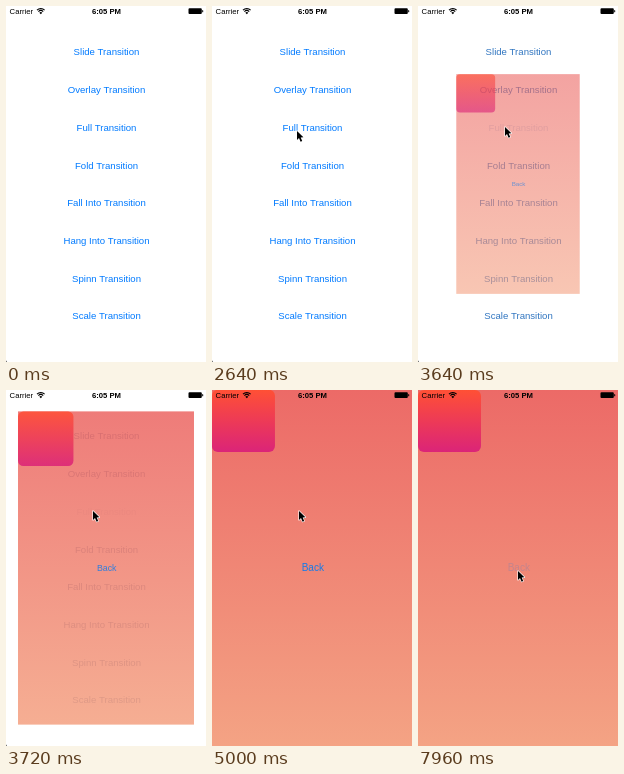
An HTML page with a canvas for the animation above (8 s loop, 200 by 356 pixels).

```html
<!DOCTYPE html>
<html lang="en">
<head>
<meta charset="utf-8">
<title>Full transition</title>
<style>
html, body { margin: 0; width: 100%; height: 100%; overflow: hidden; background: #fff; }
canvas { display: block; width: 100vw; height: 100vh; }
</style>
</head>
<body>
<canvas id="stage"></canvas>
<script>
const W = 200, H = 356, LOOP = 8000;
const FONT = '"Liberation Sans", Arial, sans-serif';
const BLUE = [0, 122, 255], DIMMED = [110, 110, 110];
const ITEMS = ['Slide', 'Overlay', 'Full', 'Fold', 'Fall Into', 'Hang Into', 'Spinn', 'Scale'];
const PRESS = 3240, OPEN = 3444, PRESS_BACK = 7680;

// Pointer tip: time, x, y
const PATH = [
  [1160, -8, 265], [1680, 97, 192], [2040, 112, 152], [2480, 85, 125],
  [2800, 85, 125], [3200, 87, 121], [5760, 87, 121], [5880, 90, 136],
  [6080, 98.5, 169], [6480, 100, 181], [8000, 100, 181]
];

const canvas = document.getElementById('stage');
const ctx = canvas.getContext('2d');

const clamp = v => Math.max(0, Math.min(1, v));
const lerp = (a, b, p) => a + (b - a) * p;
const smooth = p => p * p * (3 - 2 * p);
const ramp = (t, start, length) => clamp((t - start) / length);

function spring(ms) {
  if (ms <= 0) return 0;
  const damping = 0.57, x = 8 * ms / 1000;
  const root = Math.sqrt(1 - damping * damping);
  return 1 - Math.exp(-damping * x) *
    (Math.cos(root * x) + damping / root * Math.sin(root * x));
}

function mix(a, b, p) {
  return `rgb(${a.map((v, i) => Math.round(lerp(v, b[i], p))).join(',')})`;
}

function label(text, x, y, size, color, alpha = 1, align = 'center', weight = '') {
  ctx.save();
  ctx.font = `${weight} ${size}px ${FONT}`;
  ctx.textAlign = align;
  ctx.textBaseline = 'alphabetic';
  ctx.fillStyle = color;
  ctx.globalAlpha *= alpha;
  ctx.fillText(text, x, y);
  ctx.restore();
}

function gradient(height, top, bottom) {
  const g = ctx.createLinearGradient(0, 0, 0, height);
  g.addColorStop(0, top);
  g.addColorStop(1, bottom);
  return g;
}

function drawList(t) {
  ctx.fillStyle = '#fff';
  ctx.fillRect(0, 0, W, H);
  const color = mix(BLUE, DIMMED, ramp(t, OPEN, 450));
  ITEMS.forEach((name, i) => {
    const alpha = name === 'Full' ? lerp(1, 0.25, ramp(t, PRESS, 80)) : 1;
    label(name + ' Transition', 100.5, 49.4 + i * 37.72, 9.6, color, alpha);
  });
  ctx.fillStyle = '#777';
  ctx.fillRect(0, 354.8, 1, 1.2);
}

function drawModal(t) {
  const s = spring(t - OPEN);
  if (s <= 0) return;
  ctx.save();
  ctx.globalAlpha = clamp(s);
  ctx.translate(W / 2, H / 2);
  ctx.scale(s, s);
  ctx.translate(-W / 2, -H / 2);
  ctx.fillStyle = gradient(H, '#ec6a67', '#f4a384');
  ctx.fillRect(0, 0, W, H);
  ctx.fillStyle = gradient(62, '#ff5035', '#db2478');
  ctx.beginPath();
  ctx.roundRect(0, 0, 63, 62, 6);
  ctx.fill();
  label('Back', 100.8, 181.4, 10, '#177be8', lerp(1, 0.2, ramp(t, PRESS_BACK, 80)));
  ctx.restore();
}

function drawStatus() {
  label('Carrier', 3.6, 7.8, 7.7, '#000', 1, 'left');
  label('6:05 PM', 100.5, 7.8, 7.7, '#000', 1, 'center', 'bold');

  ctx.strokeStyle = ctx.fillStyle = '#000';
  ctx.lineWidth = 1.1;
  for (const r of [3.4, 5.4]) {
    ctx.beginPath();
    ctx.arc(34.8, 8, r, -Math.PI * 0.75, -Math.PI * 0.25);
    ctx.stroke();
  }
  ctx.beginPath();
  ctx.moveTo(34.8, 8.2);
  ctx.arc(34.8, 8.2, 2.1, -Math.PI * 0.75, -Math.PI * 0.25);
  ctx.fill();

  ctx.beginPath();
  ctx.roundRect(182.5, 2.3, 13.3, 5.8, 1);
  ctx.roundRect(196.2, 4.1, 1, 2.2, 0.4);
  ctx.fill();
}

function pointerAt(t) {
  const i = PATH.findIndex(p => p[0] > t);
  if (i < 1) return null;
  const [t0, x0, y0] = PATH[i - 1], [t1, x1, y1] = PATH[i];
  const p = smooth((t - t0) / (t1 - t0));
  return [lerp(x0, x1, p), lerp(y0, y1, p)];
}

function drawPointer(t) {
  const pos = pointerAt(t);
  if (!pos) return;
  ctx.save();
  ctx.translate(...pos);
  ctx.beginPath();
  [[0, 0], [0, 9], [2, 7.1], [3.6, 10.7], [5.2, 10], [3.7, 6.5], [6.4, 6.3]]
    .forEach(p => ctx.lineTo(...p));
  ctx.closePath();
  ctx.lineJoin = 'round';
  ctx.lineWidth = 1.2;
  ctx.strokeStyle = '#fff';
  ctx.stroke();
  ctx.fillStyle = '#000';
  ctx.fill();
  ctx.restore();
}

function frame() {
  const t = performance.now() % LOOP;
  const dpr = window.devicePixelRatio || 1;
  const w = Math.round(innerWidth * dpr), h = Math.round(innerHeight * dpr);
  if (canvas.width !== w || canvas.height !== h) {
    canvas.width = w;
    canvas.height = h;
  }
  ctx.setTransform(w / W, 0, 0, h / H, 0, 0);
  drawList(t);
  drawModal(t);
  drawStatus();
  drawPointer(t);
  requestAnimationFrame(frame);
}
frame();
</script>
</body>
</html>
```
